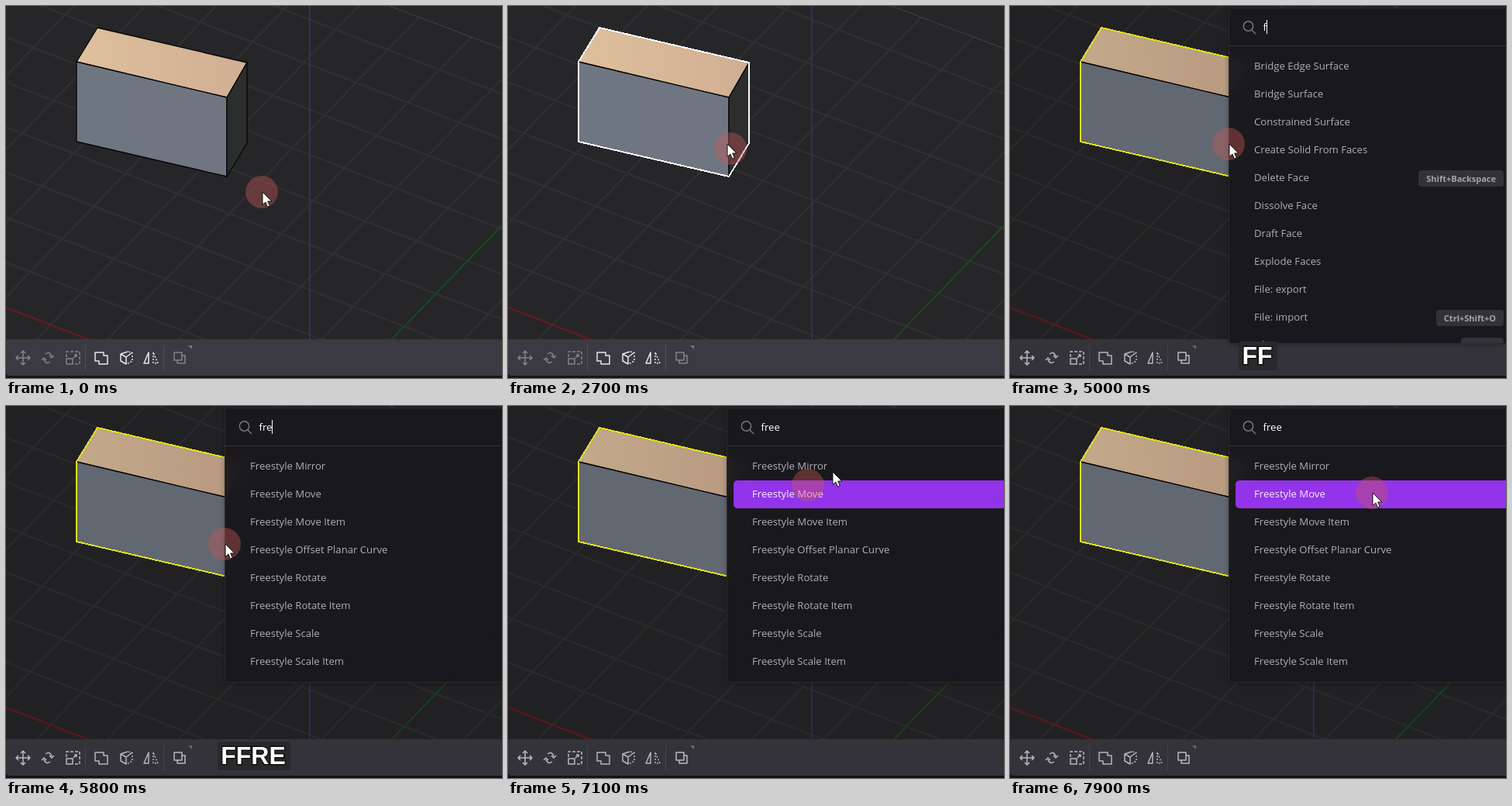
These frames come from a looping animation (640 px wide and 480 px high, 8 s). An HTML page:

```html
<!DOCTYPE html>
<html lang="en">
<head>
<meta charset="utf-8">
<title>Command search</title>
<style>
  html, body { margin: 0; width: 100%; height: 100%; overflow: hidden; background: #262628; }
  #stage { position: relative; width: 640px; height: 480px; max-width: 100%; max-height: 100%; overflow: hidden; }
  svg { position: absolute; left: 0; top: 0; display: block; }
  #panel {
    position: absolute; left: 282px; right: 0; top: 2px; box-sizing: border-box;
    overflow: hidden; border: 1px solid #2b2a2e; border-right: 0; border-radius: 5px 0 0 5px;
    background: rgba(25, 24, 28, .94); backdrop-filter: blur(14px);
    box-shadow: 0 1px 6px rgba(0, 0, 0, .3);
    font: 13.15px/35px "Open Sans", "Noto Sans", sans-serif; color: #b0afb4;
  }
  #field { height: 48px; line-height: 49px; padding-left: 43.5px; color: #fff; font-weight: 500; border-bottom: 1px solid #333237; white-space: pre; }
  #caret { display: inline-block; width: 1px; height: 18px; vertical-align: -4px; background: #fff; }
  #list { padding-top: 8px; }
  .row { position: relative; height: 36px; margin-left: 8px; padding-left: 24px; border-radius: 5px 0 0 5px; white-space: pre; }
  .row.on { background: #9333ea; color: #f6f0fc; }
  .row kbd {
    position: absolute; right: 3px; top: 8px; height: 21px; padding: 0 10px; border-radius: 4px;
    background: #333237; color: #a5a4aa; font: 700 11px/21px "Open Sans", "Noto Sans", sans-serif;
  }
  .line { fill: none; stroke-width: 1.5; stroke-linejoin: round; }
</style>
</head>
<body>
<div id="stage">
<svg width="640" height="480">
  <defs>
    <linearGradient id="tan"><stop stop-color="#dec09d"/><stop offset="1" stop-color="#d0ae92"/></linearGradient>
    <linearGradient id="grey"><stop stop-color="#6e7681"/><stop offset="1" stop-color="#707681"/></linearGradient>
  </defs>
  <rect width="640" height="480" fill="#262628"/>
  <path id="grid" fill="none" stroke="#2f2f31" stroke-width="2.5"/>
  <path d="M495 0L640 55" stroke="#434345"/>
  <path d="M0 389L108 431" stroke="#6c1a1d" stroke-width="2"/>
  <path d="M497 431L640 283" stroke="#194a1d" stroke-width="2"/>
  <path d="M392 0V431" stroke="#2c3a68" stroke-width="1.5"/>
  <g stroke="#050505" stroke-width="1.3" stroke-linejoin="round">
    <path d="M118 28L311 73L285 118L91 72Z" fill="url(#tan)"/>
    <path d="M91 72L285 118V220L91 175Z" fill="url(#grey)"/>
    <path d="M285 118L311 73V177L285 220Z" fill="#2c2d2d"/>
  </g>
  <path id="outline" d="M118 28L311 73V177L285 220L91 175V72Z" fill="none" stroke-width="2" shape-rendering="crispEdges"/>

  <rect y="430" width="640" height="50" fill="#161519"/>
  <path d="M0 430H640V477H5Q0 477 0 472Z" fill="#3b3a42"/>
  <path d="M102.5 438V470M203.5 438V470" stroke="#504f57"/>
  <g id="edit" class="line">
    <path d="M22 445V463M13 454H31M19 448L22 445L25 448M19 460L22 463L25 460M16 451L13 454L16 457M28 451L31 454L28 457"/>
    <path d="M51 449Q57 445 59 452M56 451L59 454L62 451M57 459Q51 463 49 456M46 457L49 454L52 457"/>
    <path d="M78 453V446H95V462H89" stroke-dasharray="4 2"/>
    <path d="M78 455H86V462H78ZM87 454L91 450M88 450H91V453"/>
    <path d="M217 447H227V457H217ZM221 457V461H231V451H227"/>
    <path d="M235 438H240V443Z" stroke="none" fill="#77767d"/>
  </g>
  <g id="model" class="line">
    <path d="M115 447H126V451H131V462H120V458H115Z"/>
    <path d="M157 446L148 449V458L155 462V453L148 449M155 453L163 447"/>
    <path d="M158 446L164 448M163 451V458L156 462" stroke-dasharray="2 2"/>
    <path d="M184 447V461H178Z"/>
    <path d="M190 447V461H196Z" stroke-dasharray="2 2"/>
  </g>
  <rect id="dim" width="640" height="480" fill="#000" opacity=".12"/>
</svg>

<div id="panel">
  <svg width="50" height="48" class="line" stroke="#77767c"><circle cx="24.5" cy="23" r="6.2"/><path d="M29 28L34 33"/></svg>
  <div id="field"><span id="query"></span><i id="caret"></i></div>
  <div id="list"></div>
</div>

<svg width="640" height="480">
  <g id="keys">
    <rect id="keyBox" y="433" height="37" rx="2" fill="#29292d"/>
    <text id="keyText" x="319" y="462" text-anchor="middle" fill="#fff" stroke="#111" stroke-width="3" paint-order="stroke"
      font-family="Liberation Sans, Arial, sans-serif" font-weight="700" font-size="32"></text>
  </g>
  <circle id="ring" fill="none" stroke="#c8585a" stroke-width="2"/>
  <circle id="spot" r="21" fill="#c8585a" opacity=".4"/>
  <path id="arrow" d="M0.5 0V16.5L4.4 13L7 19.2L9.8 18L7.2 12H12.3Z" fill="#fff" stroke="#111"/>
</svg>
</div>

<script>
const $ = id => document.getElementById(id);
const show = (el, on) => { el.style.display = on ? "" : "none"; };

// Orthographic ground grid: unit vectors along the red and green axes
const ox = 392, oy = 540.7, red = [66.9, 25.9], green = [40.9, -42.3];
const at = (r, g) => (ox + r * red[0] + g * green[0]) + " " + (oy + r * red[1] + g * green[1]);
let d = "";
for (let k = -10; k < 10; k++) {
  if (k) d += `M${at(-10, k)}L${at(10, k)}M${at(k, -10)}L${at(k, 10)}`;
}
$("grid").setAttribute("d", d);

const free = ["Mirror", "Move", "Move Item", "Offset Planar Curve", "Rotate", "Rotate Item", "Scale", "Scale Item"]
  .map(s => "Freestyle " + s);
const lists = {
  "": [],
  f: ["Bridge Edge Surface", "Bridge Surface", "Constrained Surface", "Create Solid From Faces",
    "Delete Face|Shift+Backspace", "Dissolve Face", "Draft Face", "Explode Faces",
    "File: export", "File: import|Ctrl+Shift+O", "File: new|Ctrl+N"],
  fr: ["Create Solid From Faces", ...free, "View: frame", "View: front"],
  fre: free,
  free
};

// Each step holds from its time until the next
const typed = [[4400, ""], [5000, "f"], [5400, "fr"], [5800, "fre"], [6100, "free"]];
const pressed = [[0, ""], [1700, "4"], [2600, ""], [4300, "F"], [4900, "FF"], [5300, "FFR"],
  [5700, "FFRE"], [6100, "FFREE"], [6900, ""]];
const path = [[0, 330, 240], [2300, 330, 240], [2400, 322, 230], [2500, 302, 204], [2600, 287, 184], [2700, 282, 178],
  [6700, 282, 178], [6800, 290, 172], [6900, 332, 143], [7000, 387, 102], [7100, 418, 85], [7200, 437, 88],
  [7600, 463, 123], [7800, 467, 112], [8000, 467, 112]];

const last = (steps, t) => steps.filter(s => s[0] <= t).pop();

function mouse(t) {
  const i = Math.max(1, path.findIndex(p => p[0] >= t));
  const [a, b] = [path[i - 1], path[i]];
  const u = Math.max(0, (t - a[0]) / (b[0] - a[0]));
  return [a[1] + (b[1] - a[1]) * u, a[2] + (b[2] - a[2]) * u];
}

function drawPanel(t, hoverY) {
  const step = last(typed, t);
  show($("panel"), step);
  show($("dim"), step);
  if (!step) return;
  const [since, query] = step, rows = lists[query];
  const hover = t >= 6800 ? Math.floor((hoverY - 60) / 36) : -1;
  $("query").textContent = query;
  $("caret").style.visibility = (t - since) % 1050 < 500 ? "visible" : "hidden";
  $("panel").style.height = (rows.length ? Math.min(434, 67 + 36 * rows.length) : 50) + "px";
  $("list").innerHTML = rows.map((row, i) => {
    const [name, key] = row.split("|");
    return `<div class="row${i === hover ? " on" : ""}">${name}${key ? `<kbd>${key}</kbd>` : ""}</div>`;
  }).join("");
}

function drawKeys(t) {
  const text = last(pressed, t)[1];
  show($("keys"), text);
  if (!text) return;
  $("keyText").textContent = text;
  const w = $("keyText").getComputedTextLength() + 10.5;
  $("keyBox").setAttribute("x", 320 - w / 2);
  $("keyBox").setAttribute("width", w);
}

function draw(t) {
  const [x, y] = mouse(t), [sx, sy] = mouse(Math.max(0, t - 100));
  const selected = t >= 2900;
  $("outline").setAttribute("stroke", selected ? "#ffff20" : t >= 2600 ? "#fff" : "none");
  $("edit").setAttribute("stroke", selected ? "#d4d4d8" : "#85848b");
  $("model").setAttribute("stroke", selected ? "#d0d0d4" : "#e8e8ec");
  drawPanel(t, sy);
  drawKeys(t);
  $("arrow").setAttribute("transform", `translate(${x + .5} ${y})`);
  $("spot").setAttribute("cx", sx);
  $("spot").setAttribute("cy", sy);
  // Click ripple
  const u = (t - 2900) / 300;
  show($("ring"), u >= 0 && u < 1);
  $("ring").setAttribute("cx", sx);
  $("ring").setAttribute("cy", sy);
  $("ring").setAttribute("r", 22 + 20 * Math.max(0, u));
  $("ring").setAttribute("opacity", .5 * (1 - u));
}

let shown = -1;
function tick() {
  const t = Math.floor(performance.now() % 8000 / 100) * 100;
  if (t !== shown) draw(shown = t);
  requestAnimationFrame(tick);
}
tick();
</script>
</body>
</html>
```
